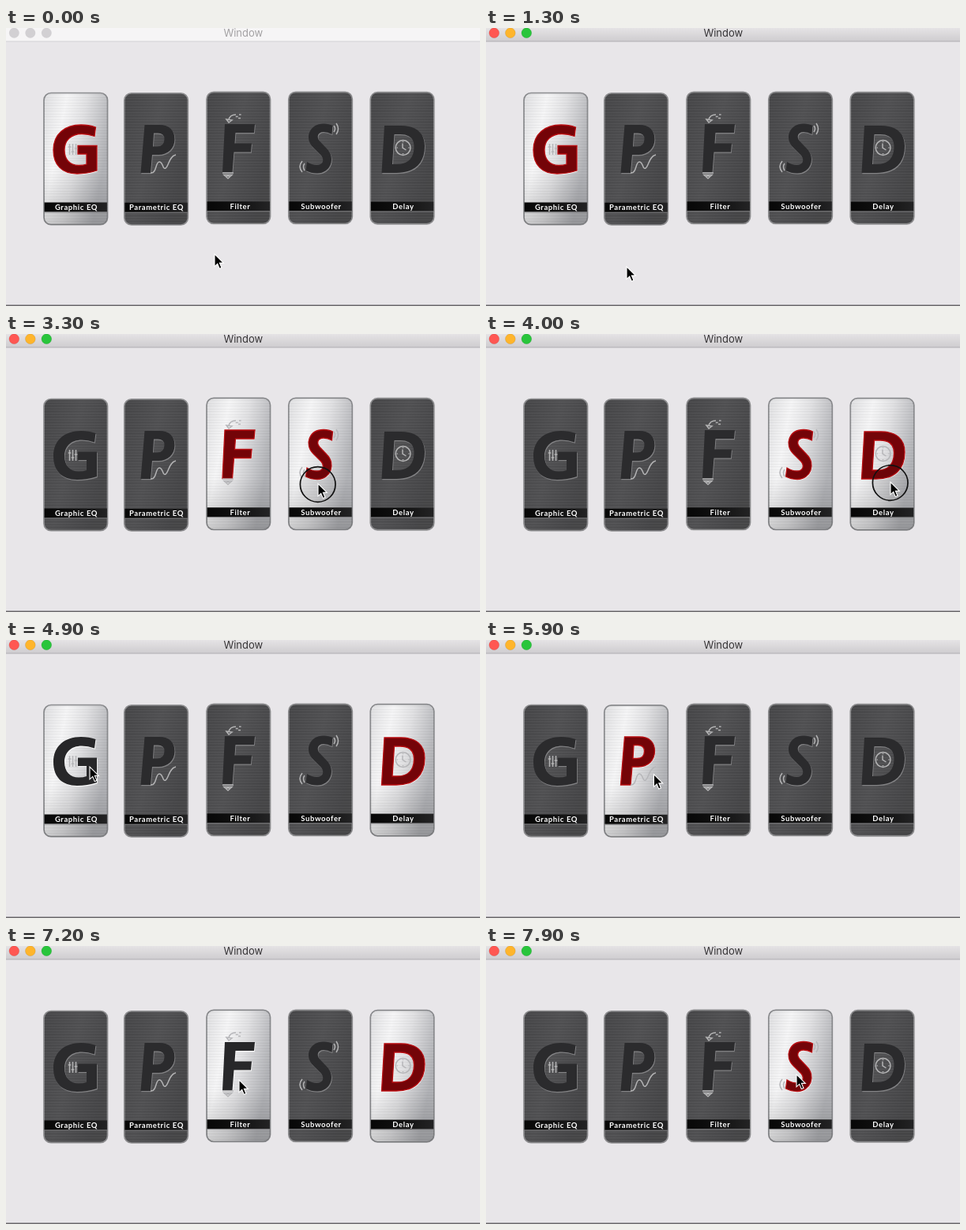
These frames come from a looping animation (600 by 353 pixels, 8 s). An HTML page:

```html
<!DOCTYPE html>
<html lang="en">
<head>
<meta charset="utf-8">
<title>Window</title>
<style>
html, body { margin: 0; width: 100%; height: 100%; overflow: hidden; background: #e8e6e9; }
svg { display: block; width: 100vw; height: 100vh; }
.title { font: 13px Inter, sans-serif; text-anchor: middle; fill: #a3a1a3; }
.active .title { fill: #363436; }
.bar { fill: #f6f5f6; }
.active .bar { fill: url(#chrome); }
.edge { fill: #d4d2d5; }
.active .edge { fill: #b2b0b3; }
.light { fill: #d2d0d3; }
.active .light { fill: var(--on); stroke: #0002; stroke-width: .6; }

.plate { fill: url(#dark); stroke: #8b8b8d; stroke-width: 1.7; }
.lit .plate { fill: url(#silver); stroke: #88898c; }
.shade { fill: url(#floor); opacity: 0; }
.lit .shade { opacity: 1; }
.brush { fill: url(#grain); opacity: .25; }
.letter { fill: #2b2b2d; fill-rule: evenodd; }
.relief { fill: #828284; fill-rule: evenodd; }
.lit .letter { fill: #272729; }
.lit .relief { fill: #f8f8f8; }
.red .letter { fill: #740408; stroke: #b80d11; stroke-width: 1.3; }
.icon { fill: none; stroke: #b3b3b4; stroke-width: 1.5; }
.lit .icon { stroke: #b6b6b9; }
.label { font: 700 9.5px Lato, sans-serif; letter-spacing: .6px; text-anchor: middle; fill: #fff; }
.rule { fill: #818183; }
</style>
</head>
<body>
<svg id="stage" viewBox="0 0 600 353" preserveAspectRatio="none">
  <defs>
    <linearGradient id="chrome" x2="0" y2="1">
      <stop stop-color="#e5e3e5"/><stop offset="1" stop-color="#cecccf"/>
    </linearGradient>
    <linearGradient id="dark" x2="1" y2=".5">
      <stop stop-color="#474749"/><stop offset=".5" stop-color="#515153"/><stop offset="1" stop-color="#464648"/>
    </linearGradient>
    <linearGradient id="silver" x2="1" y2=".4">
      <stop stop-color="#dedee0"/><stop offset=".32" stop-color="#f5f5f6"/>
      <stop offset=".6" stop-color="#e0e0e2"/><stop offset="1" stop-color="#b0b1b5"/>
    </linearGradient>
    <linearGradient id="floor" x2="0" y2="1">
      <stop offset=".6" stop-opacity="0"/><stop offset="1" stop-opacity=".16"/>
    </linearGradient>
    <linearGradient id="strip">
      <stop stop-color="#070707"/><stop offset=".5" stop-color="#111"/><stop offset="1" stop-color="#232324"/>
    </linearGradient>
    <pattern id="grain" width="600" height="7" patternUnits="userSpaceOnUse">
      <path d="M0 .5H600M0 4.5H600" stroke="#000" stroke-opacity=".14"/>
      <path d="M0 2.5H600M0 5.5H600" stroke="#fff" stroke-opacity=".14"/>
    </pattern>
  </defs>
  <rect width="600" height="353" fill="#e8e6e9"/>
  <g id="chromeBar">
    <rect class="bar" width="600" height="17"/>
    <rect class="edge" y="16.5" width="600" height="1"/>
    <circle class="light" cx="10.3" cy="6.3" r="6.4" style="--on:#ff5752"/>
    <circle class="light" cx="30.8" cy="6.3" r="6.4" style="--on:#ffb52c"/>
    <circle class="light" cx="51.3" cy="6.3" r="6.4" style="--on:#29c53b"/>
    <text class="title" x="300.3" y="11">Window</text>
  </g>
  <rect y="351.5" width="600" height="1.5" fill="#69676a"/>
  <g id="cards"></g>
  <circle id="ring" r="22.3" fill="#000" fill-opacity=".06" stroke="#111" stroke-width="1.7"/>
  <path id="cursor" d="M0 0V15.8L3.7 12.4 6.3 18.6 9 17.5 6.4 11.4H11.3Z" fill="#000" stroke="#fff" stroke-width="1.1"/>
</svg>
<script>
const LOOP = 8000, STEP = 100, CARD_W = 80.5, CARD_H = 167.2;
const $ = id => document.getElementById(id);

const cards = [
  { x: 48, y: 82.5, label: 'Graphic EQ', textX: 89,
    letter: 'M113.5 126L112 137.5Q104 134.5 96 134.5C82 134.5 74 143 74 155C74 167 81 174.5 92 174.5Q98 174.5 102 173V160H91V149.5H115V181Q103 185 90 185C71 185 60 174 60 155C60 135 74 123 95 123Q105 123 113.5 126Z',
    icon: 'M80.5 147V161M84.5 147V161M88.5 147V161M78.7 151H82.3M82.7 157H86.3M86.7 153H90.3' },
  { x: 149.8, y: 82.8, label: 'Parametric EQ', textX: 190.5,
    letter: 'M175.5 123H194C207 123 213.5 130 213.5 141C213.5 153 205 161 193 161H185L183 184H170.5ZM187 133.5L186 150.5H191Q200.5 150.5 200.5 141Q200.5 133.5 192 133.5Z',
    icon: 'M183 184C191 185 189 170 194 170S198 180 202 178S206 163 215 161' },
  { x: 254, y: 81.3, label: 'Filter', textX: 296.5,
    letter: 'M277 122H315L314 133H290.5L289.5 146.5H311L310 157.5H288.5L286.5 183.5H274Z',
    icon: 'M291 110Q283 110 282 117M279 116L282 120 286 117ZM290.7 112.5h3M295 110h2.6M294 114.5h3M274 184H288M276 186.5H286L281 191ZM279 188h4' },
  { x: 357.8, y: 81.3, label: 'Subwoofer', textX: 399,
    letter: 'M413.5 124L412.5 135Q407 132 402 132C394 132 393 139 397 143.5L406 153C418 165 411 184.5 394 184.5Q386 184.5 379.5 181L381 170Q387 174 393.5 174C402 174 403 167 399 162L389 152C377 140 384 121.5 402 121.5Q409 121.5 413.5 124Z',
    icon: 'M415 124Q418 128 415 132M418 121Q423 128 418 135M378 172Q375 176 378 181M375 169Q369 176 375 183' },
  { x: 461.3, y: 81.6, label: 'Delay', textX: 502.9,
    letter: 'M479 124H500C519 124 530 133 530 150C530 172 517 184 494 184H475.5ZM491.5 135L489 173H495C509 173 516.5 165 516.5 151C516.5 140 510 135 499 135Z',
    icon: 'M493.2 152a9.4 9.4 0 1 0 18.8 0a9.4 9.4 0 1 0 -18.8 0M502 146.5V152L506.5 155M502.5 143.8v1.2M502.5 159v1.2M494.6 152h1.2M509.4 152h1.2' }
];

$('cards').innerHTML = cards.map(({ x, y, label, textX, letter, icon }) => {
  const box = `x="${x}" y="${y}" width="${CARD_W}" height="${CARD_H}" rx="9"`;
  const stripY = y + 139;
  return `<g>
    <rect class="plate" ${box}/><rect class="shade" ${box}/><rect class="brush" ${box}/>
    <path class="relief" d="${letter}" transform="translate(.8 1.3)"/>
    <path class="letter" d="${letter}"/><path class="icon" d="${icon}"/>
    <rect x="${x + .6}" y="${stripY}" width="${CARD_W - 1.2}" height="12" fill="url(#strip)"/>
    <rect class="rule" x="${x + .6}" y="${stripY + 12}" width="${CARD_W - 1.2}" height=".9"/>
    <text class="label" x="${textX}" y="${stripY + 9.4}">${label}</text></g>`;
}).join('');
const cardNodes = [...$('cards').children];

// Pointer stops: time, x, y and an optional control point for the way there
const stops = [
  [0, 264, 287], [300, 73, 152], [500, 73, 152], [1100, 178, 303], [1700, 178, 303],
  [2100, 190, 172], [2500, 190, 172], [2700, 291, 196], [2800, 291, 196],
  [3100, 395, 190], [3400, 395, 190], [3800, 512, 188], [4100, 512, 188],
  [4900, 106, 161, 330, 365], [5000, 104, 163], [5300, 104, 163], [5500, 190, 170],
  [5800, 190, 170], [6400, 493, 177], [6700, 493, 177], [7200, 295, 170],
  [7400, 295, 170], [7600, 393, 163], [LOOP, 393, 163]
];

// Clicks: press time, release time, card selected
const clicks = [
  [1100, 1300, 0], [2500, 2600, 1], [2800, 2900, 2], [3300, 3400, 3], [3900, 4100, 4],
  [5100, 5200, 0], [5800, 5900, 1], [6600, 6700, 4], [7300, 7400, 2], [7800, 7900, 3]
];

function pointerAt(t) {
  const i = stops.findIndex(stop => stop[0] > t);
  const [t0, x0, y0] = stops[i - 1];
  const [t1, x1, y1, cx = (x0 + x1) / 2, cy = (y0 + y1) / 2] = stops[i];
  const p = (t - t0) / (t1 - t0), k = p * p * (3 - 2 * p);
  const bend = (a, c, b) => (1 - k) ** 2 * a + 2 * k * (1 - k) * c + k * k * b;
  return [bend(x0, cx, x1), bend(y0, cy, y1)];
}

function render(t) {
  const [x, y] = pointerAt(t);
  const press = clicks.find(([down, up]) => t >= down && t < up);
  const selected = clicks.filter(([, up]) => up <= t).pop()?.[2] ?? 0;

  $('chromeBar').classList.toggle('active', t >= clicks[0][0]);
  cards.forEach((card, i) => {
    const chosen = i === selected || i === press?.[2];
    const hovered = x >= card.x && x <= card.x + CARD_W && y >= card.y && y <= card.y + CARD_H;
    cardNodes[i].classList.toggle('red', chosen);
    cardNodes[i].classList.toggle('lit', chosen || hovered);
  });
  $('cursor').setAttribute('transform', `translate(${x} ${y})`);
  $('ring').setAttribute('transform', `translate(${x - .3} ${y + 1})`);
  $('ring').setAttribute('visibility', press ? 'visible' : 'hidden');
}

function tick() {
  render(Math.floor(performance.now() % LOOP / STEP) * STEP);
  requestAnimationFrame(tick);
}
tick();
</script>
</body>
</html>
```
